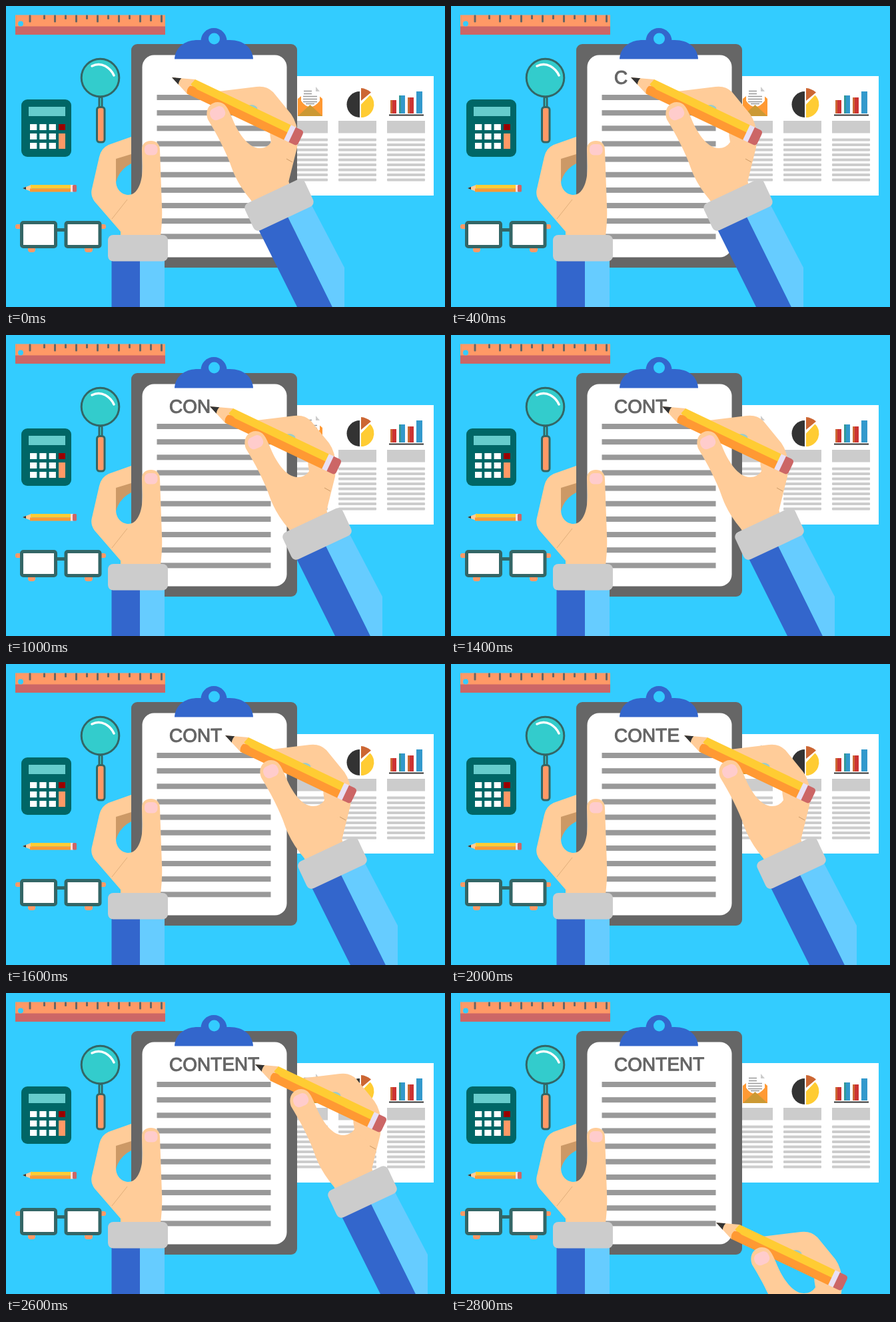
Recreate the animation shown at these times as an HTML page. Size 659 px wide and 451 px high, loop 3000 ms.

```html
<!DOCTYPE html>
<html lang="en">
<head>
<meta charset="utf-8">
<title>Writing content</title>
<style>
  html, body { margin: 0; width: 100%; height: 100%; overflow: hidden; background: #3cf; }
  svg { display: block; width: 659px; height: 451px; }
  text { font: 28px "Liberation Sans", Arial, sans-serif; }
</style>
</head>
<body>
<svg viewBox="0 0 659 451">
  <rect width="659" height="451" fill="#3cf"/>

  <g id="ruler">
    <path d="M14 13.5H239V31H14Z" fill="#f96"/>
    <path d="M14 30.5H239V43H14Z" fill="#c66"/>
    <circle cx="22" cy="26.5" r="4" fill="#3cf"/>
  </g>

  <g id="magnifier" stroke="#366" stroke-width="3">
    <path d="M142 136V152" stroke-width="7"/>
    <path d="M142 138V150" stroke="#3cc" stroke-width="1.5"/>
    <circle cx="141.5" cy="107.5" r="28.3" fill="#3cc"/>
    <path d="M129 90Q139 85 149 90Q158 95 162 104" fill="none" stroke="#fff" stroke-width="3.5" stroke-linecap="round"/>
    <rect x="136.5" y="151.5" width="11.5" height="52.5" rx="4" fill="#f96"/>
  </g>

  <g id="calculator">
    <rect x="23" y="140" width="75" height="86" rx="9" fill="#066"/>
    <path d="M34 151H89V165H34Z" fill="#6cc"/>
    <path d="M79 177H89V186H79Z" fill="#900"/>
    <path d="M79 191H89V214H79Z" fill="#f96"/>
  </g>

  <g id="small-pencil">
    <path d="M25 273L39 267.5V278.5Z" fill="#fc9"/>
    <path d="M25 273L30 271V275Z" fill="#333"/>
    <path d="M37 268H98V273.5H37Z" fill="#fc3"/>
    <path d="M36 273.5H98V278.5H36Z" fill="#f93"/>
    <path d="M97 268H101V278.5H97Z" fill="#fdd"/>
    <rect x="100" y="268" width="6" height="10.5" rx="1.5" fill="#c66"/>
  </g>

  <g id="glasses">
    <g fill="#f96">
      <rect x="14" y="327" width="10" height="7" rx="3"/>
      <rect x="140" y="327" width="10" height="7" rx="3"/>
      <rect x="33" y="360" width="11" height="9" rx="4"/>
      <rect x="118" y="360" width="12" height="9" rx="4"/>
    </g>
    <g fill="#fff" stroke="#366" stroke-width="5">
      <path d="M76 335.5H90"/>
      <rect x="23.5" y="324.5" width="51" height="36" rx="2.5"/>
      <rect x="90" y="324.5" width="51" height="36" rx="2.5"/>
    </g>
  </g>

  <g id="report">
    <path d="M430 105H642V284H430Z" fill="#fff"/>
    <path d="M438 139L447 132H467L475 139V165H438Z" fill="#f93"/>
    <path d="M443 122H465L471 128V142Q464 151 457 151Q449 151 443 142Z" fill="#fff"/>
    <path d="M465 121L471 128H465Z" fill="#ccc"/>
    <path d="M447 127.5H459M447 131.5H459M446 135.5H467M446 139.5H467M446 143.5H467M450 146.5H463" stroke="#999" stroke-width="1.7"/>
    <path d="M438 165L456.500 148L475 165Z" fill="#c93"/>
    <path d="M531 128A19.500 19.500 0 0 0 531 167Z" fill="#333"/>
    <path d="M533 147.500L546.500 133.500A19.500 19.500 0 0 1 533 167Z" fill="#fc3"/>
    <path d="M533 142V123Q541 123.500 548 129.500Z" fill="#c63"/>
    <path d="M575 163.500H627" stroke="#333" stroke-width="2"/>
  </g>

  <g id="clipboard">
    <rect x="188" y="57" width="249" height="335" rx="9" fill="#666"/>
    <rect x="204.500" y="73.500" width="217" height="303" rx="18" fill="#fff"/>
    <g fill="#36c">
      <circle cx="312" cy="52.500" r="19.500"/>
      <path d="M253 79.500C254 62 268 51 288 51H336C356 51 370 62 371 79.500Z"/>
    </g>
    <circle cx="312.500" cy="49" r="8.500" fill="#3cf"/>
  </g>

  <text id="heading" x="245" y="116.300" transform="rotate(-.4 313 106)" fill="#666" stroke="#666" stroke-width="1.100" stroke-linejoin="round"></text>

  <g id="left-arm">
    <path d="M165 228L188 221V236Q170 245 165 264Z" fill="#c96"/>
    <path d="M188 196L154 208Q143 213 140 226L128.500 276Q127 285 133 293L172 338V345H232Q235 320 234 300L231 216C231 206 225 202 217.500 202C209 202 204 207 204 215L205 240C205 265 197 283 184 283C173 283 165 274 165 262V229L188 222Z" fill="#fc9"/>
    <path d="M182 290L159 319" stroke="#c96" stroke-width=".6"/>
    <rect x="208" y="207" width="19.500" height="16.500" rx="6.500" fill="#fcc"/>
    <path d="M158.500 380H201V451H158.500Z" fill="#36c"/>
    <path d="M201 380H238V451H201Z" fill="#6cf"/>
    <rect x="153" y="343" width="90" height="39.500" rx="8" fill="#ccc"/>
  </g>

  <g id="right-arm">
    <path d="M310 129L376 121Q391 119 401 129L428 162Q441 180 437 212L424 264L400 270L398 204Q396 195 396 185L330 155Z" fill="#fc9"/>
    <path d="M364 149Q371 146 377 152L378 157Z" fill="#9cc"/>
    <g id="pencil" transform="translate(249 107) rotate(25.400)">
      <path d="M0 0L33 -12.300L40 0L31 12.300Z" fill="#fc9"/>
      <path d="M0 0L13.500 -5Q11.500 0 13.500 5.500Z" fill="#333"/>
      <path d="M33 -12.300H193V1H42Q35 0 30 -3Z" fill="#fc3"/>
      <path d="M30 0Q36 -3 42 0H193V12.300H31Q27 6 30 0Z" fill="#f93"/>
      <path d="M192 -12.300H201V12.300H192Z" fill="#e9e0f4"/>
      <path d="M200 -12.300H209Q214 -12.300 214 -7V7Q214 12.300 209 12.300H200Z" fill="#c66"/>
    </g>
    <path d="M318 144C329 144 333 153 339 167C347 187 362 213 381 213Q392 213 398 204L426 230L424 262L430 280L376 305L367 290Q348 268 339 243C331 219 316 191 303 170C298 157 305 144 318 144Z" fill="#fc9"/>
    <path d="M421 229L430 234" stroke="#c96"/>
    <rect x="306" y="151.500" width="23" height="18.500" rx="8" transform="rotate(-25 317.500 160.500)" fill="#fcc"/>
    <path d="M378 333L422 313L490 451H437Z" fill="#36c"/>
    <path d="M422 314L456 293L508 392V451H490Z" fill="#6cf"/>
    <rect x="360.500" y="275.500" width="99" height="45" rx="8" transform="rotate(-25 410 298)" fill="#ccc"/>
  </g>
</svg>
<script>
  const byId = id => document.getElementById(id);

  function addRect(parent, x, y, width, height, fill, rx = 0) {
    const rect = document.createElementNS("http://www.w3.org/2000/svg", "rect");
    Object.entries({ x, y, width, height, fill, rx }).forEach(([k, v]) => rect.setAttribute(k, v));
    byId(parent).append(rect);
  }

  addRect("ruler", 34.5, 13.5, 3, 11, "#666", 1);
  for (let i = 0; i < 12; i++)
    addRect("ruler", 56 + i * 16, 13.5, 3, i % 2 ? 11 : 6.5 + (i > 8 ? 3 : 0), "#666", 1);

  for (let row = 0; row < 3; row++)
    for (let col = 0; col < 3; col++)
      addRect("calculator", 36 + col * 14.3, 177 + row * 14, 10.3, 9, "#fff");

  for (const [x, width] of [[430, 53], [499, 57], [572, 57]]) {
    addRect("report", x, 172, width, 18.5, "#ccc");
    for (let i = 0; i < 9; i++) addRect("report", x, 198.5 + i * 7.5, width, 4, "#ccc", 1);
  }

  const bars = [[577, 141, "#c63", "#c33"], [590, 134, "#399", "#39c"],
                [603, 137, "#c63", "#c33"], [616, 128, "#39c", "#39c"]];
  for (const [x, y, left, right] of bars) {
    addRect("report", x, y, 4, 20 + 141 - y, left);
    addRect("report", x + 3, y, 6, 20 + 141 - y, right);
  }

  for (let i = 0; i < 10; i++) addRect("clipboard", 226.5, 133 + i * 23.15, 171, 8, "#999");

  // Horizontal arm position for each 200 ms step; the last one drops to the page foot.
  const STEP = 200;
  const armX = [0, 13, 21, 34, 46, 57, 65, 68, 80, 91, 101, 112, 120, 125, 149];
  const word = "CONTENT";
  const start = performance.now();

  function draw(now) {
    const step = Math.floor(Math.max(0, now - start) / STEP) % armX.length;
    const armY = step === armX.length - 1 ? 237 : 0;
    byId("right-arm").setAttribute("transform", `translate(${armX[step]} ${armY})`);
    byId("heading").textContent = word.slice(0, Math.ceil(step / 2));
    requestAnimationFrame(draw);
  }
  draw(start);
</script>
</body>
</html>
```
